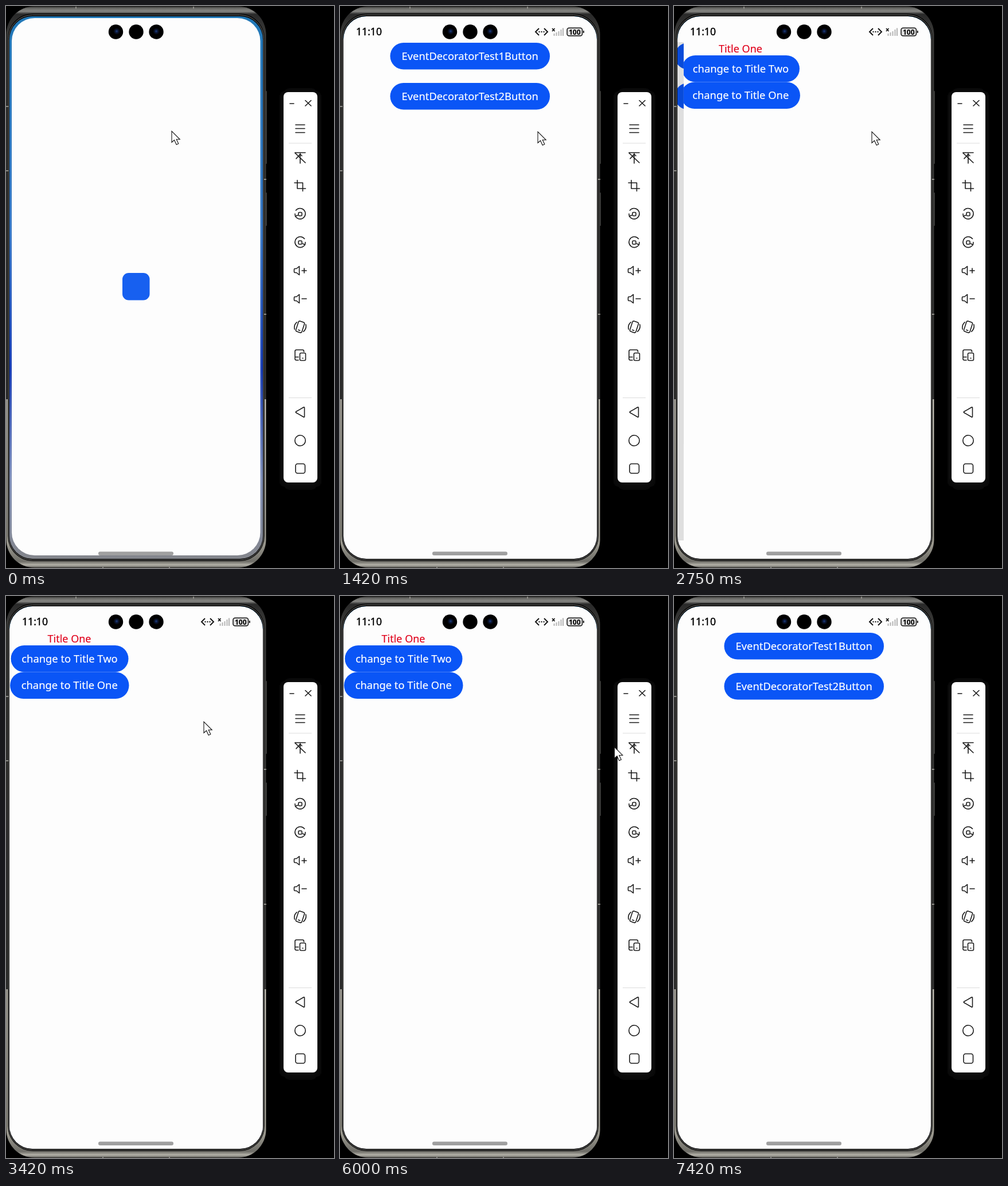
Recreate the animation shown at these times as an HTML page. Size 572 by 979 pixels, loop 7500 ms.

```html
<!DOCTYPE html>
<html lang="en">
<head>
<meta charset="utf-8">
<title>Phone navigation</title>
<style>
  html, body { margin: 0; width: 100%; height: 100%; overflow: hidden; background: #000; }
  svg { display: block; width: 572px; height: 979px; }
  text { font: 18.35px "Noto Sans", "Open Sans", sans-serif; }
  .btn rect { fill: #0a55f6; }
  .btn text { fill: #fff; stroke: #fff; stroke-width: .2; text-anchor: middle; }
  .title { fill: #e0001b; stroke: #e0001b; stroke-width: .15; font-size: 18px; }
  .page { fill: #fdfdfd; }
  .icons { fill: none; stroke: #1b1b1b; stroke-width: 1.6; stroke-linecap: round; stroke-linejoin: round; }
</style>
</head>
<body>
<svg viewBox="0 0 572 979">
  <defs>
    <linearGradient id="metal" x2="0" y2="1">
      <stop offset="0" stop-color="#2c2c2b"/>
      <stop offset=".004" stop-color="#6e6e6b"/>
      <stop offset=".009" stop-color="#868683"/>
      <stop offset=".014" stop-color="#2a2a2a"/>
      <stop offset=".05" stop-color="#3a3a38"/>
      <stop offset=".6995" stop-color="#353534"/>
      <stop offset=".6996" stop-color="#bdbab0"/>
      <stop offset=".96" stop-color="#98968c"/>
      <stop offset=".989" stop-color="#6f6e68"/>
      <stop offset=".995" stop-color="#b3b1a8"/>
      <stop offset="1" stop-color="#5c5b57"/>
    </linearGradient>
    <linearGradient id="wall" x2="0" y2="1">
      <stop offset="0" stop-color="#2279b8"/>
      <stop offset=".4" stop-color="#3a78c4"/>
      <stop offset=".65" stop-color="#1b3fb4"/>
      <stop offset=".85" stop-color="#7f8fb8"/>
      <stop offset="1" stop-color="#84868c"/>
    </linearGradient>
    <radialGradient id="lens">
      <stop offset="0" stop-color="#1c3f86"/>
      <stop offset=".45" stop-color="#0a1533"/>
      <stop offset="1" stop-color="#000"/>
    </radialGradient>
    <filter id="soft" x="-50%" width="200%"><feGaussianBlur stdDeviation="8"/></filter>
    <clipPath id="screen"><rect x="6" y="18" width="442" height="945" rx="40"/></clipPath>
    <clipPath id="cover"><rect id="coverRect" x="6" y="63" width="442" height="868"/></clipPath>
  </defs>

  <rect width="572" height="979"/>

  <!-- phone body -->
  <rect x="452" y="148" width="3" height="127" rx="1" fill="#3b3b39"/>
  <rect x="452" y="325" width="3" height="58" rx="1" fill="#3b3b39"/>
  <rect x=".5" y=".5" width="453" height="978" rx="49" fill="url(#metal)"/>
  <rect x="3" y="13" width="448" height="954" rx="44" fill="#0a0a0a"/>
  <rect x="4.5" y="15.5" width="445" height="949.5" rx="42" fill="none" stroke="#6d6c69"/>
  <path d="M122 1v4M327 1v4M0 175h4M0 287h4M450 302h4M450 537h4M169 975v4M285 975v4" stroke="#8b8a85" stroke-width="2"/>

  <!-- screen -->
  <g clip-path="url(#screen)">
    <rect x="6" y="18" width="442" height="945" fill="url(#wall)"/>
    <rect id="window" class="page" rx="40"/>
    <rect id="splash" x="203" y="465" width="47.5" height="47.5" rx="11" fill="#1760f0"/>
    <g id="app">
      <g id="home"></g>
      <rect id="dim" x="6" y="63" width="442" height="868"/>
      <g id="detail" clip-path="url(#cover)">
        <rect class="page" x="6" y="63" width="442" height="868"/>
        <g id="detailBody"><text class="title" x="72.5" y="81">Title One</text></g>
      </g>
    </g>
    <g id="status">
      <text x="28" y="51" style="font-size:17.6px" stroke="#000" stroke-width=".4">11:10</text>
      <path d="M347 39l-6 6 6 6M356 39l6 6-6 6" fill="none" stroke="#111" stroke-width="1.9"/>
      <path d="M346.5 45h2m2 0h2m2 0h2" stroke="#111" stroke-width="2"/>
      <path d="M370 39l4.5 5m0-5l-4.5 5" stroke="#111" stroke-width="1.7"/>
      <path d="M373.5 52v-4M377.5 52v-6M381.500 52v-8M385.500 52v-11M389 52v-13.500" stroke="#b4b4b4" stroke-width="2"/>
      <rect x="396" y="38.300" width="26.500" height="13.700" rx="3.500" fill="#ddd" stroke="#111" stroke-width="1.500"/>
      <path d="M424.800 43v4" stroke="#111" stroke-width="1.800"/>
      <text x="409.300" y="49.500" text-anchor="middle" style="font-size:12px;font-weight:700">100</text>
    </g>
    <rect x="161" y="950.500" width="131" height="6.500" rx="3.200" fill="#a0a0a0"/>
  </g>
  <circle cx="191.500" cy="45" r="12.700"/><circle cx="193" cy="44" r="6" fill="url(#lens)"/>
  <circle cx="227" cy="45" r="12.700"/>
  <circle cx="262" cy="45" r="12.700"/><circle cx="262" cy="44" r="6" fill="url(#lens)"/>

  <!-- side panel -->
  <rect x="482" y="148" width="63" height="690" rx="10" fill="#141417" filter="url(#soft)"/>
  <rect x="484" y="150" width="59" height="680" rx="8" fill="#fff"/>
  <path d="M493 239h40M493 682.500h40" stroke="#dcdcdc"/>
  <g class="icons">
    <path d="M495 170h7M522 164.500l10 9.500m0-9.500l-10 9.500M505 207h16M505 213.500h16M505 220.500h16"/>
    <path d="M504 255.500h18M504 256l18 17M513 274v-17M506 266l7-8 3 3"/>
    <path d="M503 308h14.500v14.500M508 303.500v14.500h14.500"/>
    <g id="turn">
      <path d="M504.500 366a9.300 9.300 0 1 0 1-10M504 362l.5 4.500 4-2"/>
      <rect x="510" y="359.500" width="6" height="6" rx="1.500"/>
    </g>
    <use href="#turn" transform="matrix(-1 0 0 1 1026 49.500)"/>
    <g id="speaker"><path d="M511.500 453.500v15l-5-4h-2.500q-1.500 0-1.500-1.500v-4q0-1.500 1.500-1.500h2.500z"/><path d="M516 461h8"/></g>
    <path d="M520 457v8"/>
    <use href="#speaker" y="49"/>
    <g transform="rotate(18 513 559)">
      <rect x="507.500" y="549.500" width="11" height="19" rx="2.500"/>
      <path d="M511.500 565h3M505 553q-4 6 0 13M521 552q4 6 0 13"/>
    </g>
    <path d="M510 617h-3.500q-2.500 0-2.500-2.500v-13q0-2.500 2.500-2.500h10.500q2.500 0 2.500 2.500v1M504 611.500h6"/>
    <rect x="512.500" y="604.500" width="10" height="13" rx="2"/>
    <path d="M517 613.500h1M506 706.500l13-7.500q1.500-.5 1.500 1v15q0 1.500-1.500 1l-13-7.500q-1.500-1 0-2z"/>
    <circle cx="513" cy="757" r="9.200"/>
    <rect x="505" y="797.500" width="16.500" height="16.500" rx="3.500"/>
  </g>

  <path id="cursor" d="M0 0v19.500l4.500-4 3.700 8 3.600-1.700-3.600-7.500h6z" fill="#fff" stroke="#111" stroke-width="1.100"/>
</svg>
<script>
const LOOP = 7500, STEP = 1000 / 12, WIDTH = 442;
const OPENED = 250, LOADED = 750, PUSH = 2448, POP = 6415;
const CURSOR = [[0, 289, 218], [350, 289, 218], [900, 345, 219], [5700, 345, 219], [6250, 590, 300], [LOOP, 590, 300]];

const $ = id => document.getElementById(id);
const set = (id, attrs) => { for (const k in attrs) $(id).setAttribute(k, attrs[k]); };
const show = (id, on) => { $(id).style.display = on ? '' : 'none'; };

function addButton(parent, label, x, y, w, h) {
  $(parent).insertAdjacentHTML('beforeend',
    `<g class="btn"><rect x="${x}" y="${y}" width="${w}" height="${h}" rx="${h / 2}"/>` +
    `<text x="${x + w / 2}" y="${y + h / 2 + 6.4}">${label}</text></g>`);
}
addButton('home', 'EventDecoratorTest1Button', 87.5, 64, 278.5, 46.5);
addButton('home', 'EventDecoratorTest2Button', 87.5, 134, 278.5, 46.5);
addButton('detailBody', 'change to Title Two', 8.5, 86, 205, 46.5);
addButton('detailBody', 'change to Title One', 7, 132.5, 207.5, 46.5);

// Critically damped spring: distance left after t ms
const spring = t => t <= 0 ? 1 : (1 + .0185 * t) * Math.exp(-.0185 * t);

function track(keys, t) {
  const i = Math.max(1, keys.findIndex(k => k[0] > t));
  const [a, b] = [keys[i - 1], keys[i]];
  const p = (t - a[0]) / (b[0] - a[0]);
  return [a[1] + (b[1] - a[1]) * p, a[2] + (b[2] - a[2]) * p];
}

function draw(t) {
  const gap = Math.max(0, 1 - t / OPENED) ** 2;
  set('window', { x: 6 + 4 * gap, y: 18 + 3 * gap, width: WIDTH - 8.5 * gap, height: 945 - 9 * gap });
  show('splash', t < LOADED);
  show('app', t >= LOADED);
  show('status', t >= OPENED);

  const away = t < POP ? spring(t - PUSH) : 1 - spring(t - POP);
  const shift = WIDTH * away;
  set('home', { transform: `translate(${-.2 * (WIDTH - shift)})` });
  set('dim', { opacity: .12 * (1 - away) });
  set('coverRect', { x: 6 + shift });
  set('detailBody', { transform: `translate(${shift / 2})` });
  show('detail', away < .998);

  set('cursor', { transform: `translate(${track(CURSOR, t)})` });
}

function tick() {
  const t = performance.now() % LOOP;
  draw(Math.min(89, Math.floor((t + 5) / STEP)) * STEP);
  requestAnimationFrame(tick);
}
tick();
</script>
</body>
</html>
```
